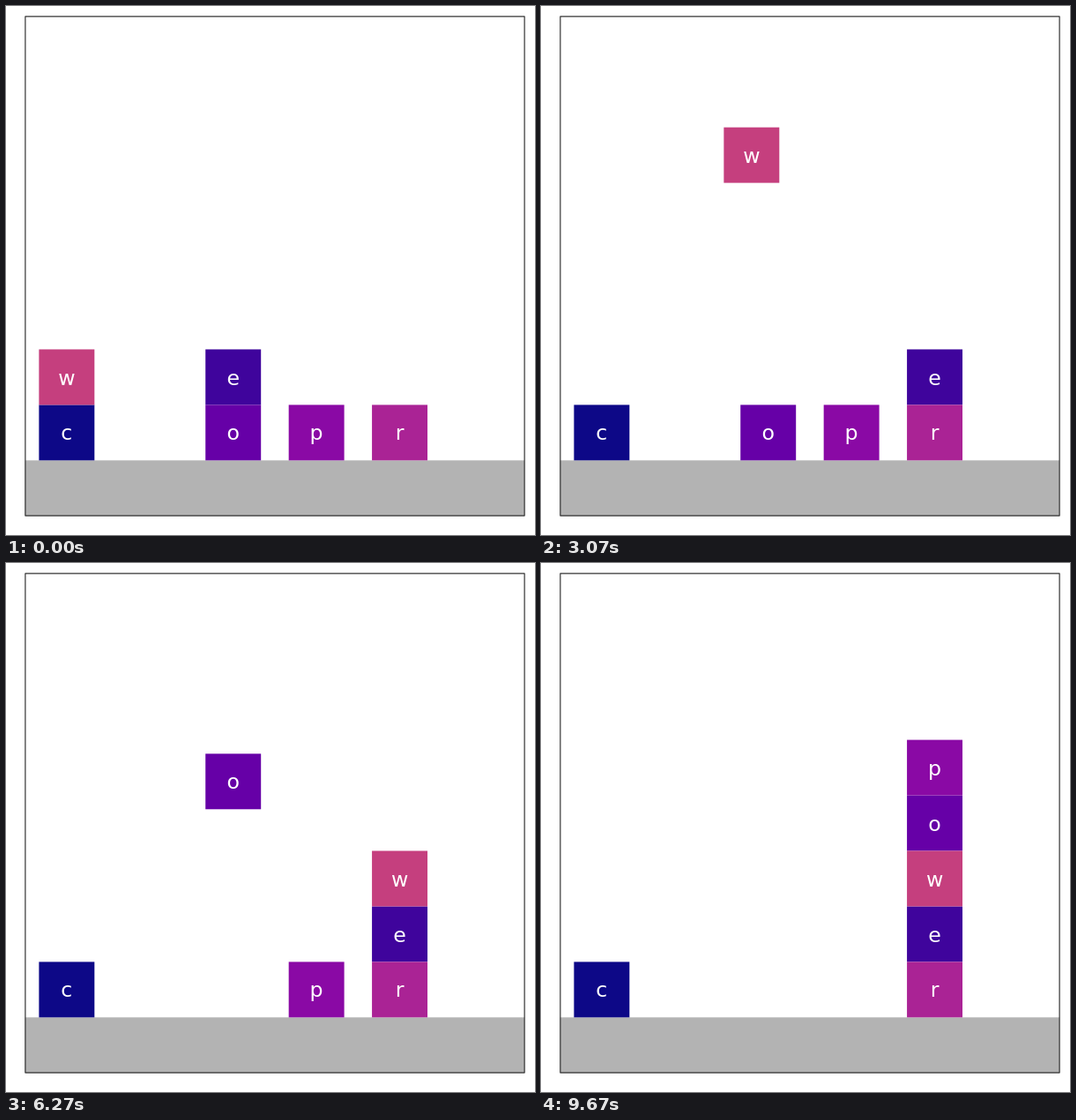
Write an HTML page with a canvas that moves like this. It is 600 px wide and 600 px high and loops after 9.71 s.

```html
<!DOCTYPE html>
<html lang="en">
<head>
<meta charset="utf-8">
<title>Stacking blocks</title>
<style>
  html, body { margin: 0; width: 100%; height: 100%; overflow: hidden; background: #fff; }
  canvas { display: block; }
</style>
</head>
<body>
<canvas id="stage" width="600" height="600"></canvas>
<script>
const ctx = document.getElementById('stage').getContext('2d');

const LOOP = 9710, FRAME = 1000 / 30, LAST_FRAME = 290;
const UNIT = 62.95, LEFT = 21.65, BOTTOM = 578.3;
const CARRY_LEVEL = 6;

// Timing of one move, in frames
const MOVE = 58, LIFT = 20, ACROSS_START = 29, ACROSS = 10, DROP = 20;

// Column is the horizontal slot, level the height above the floor
const blocks = {
  c: { column: 0, level: 1, color: '#0d0887' },
  e: { column: 2, level: 2, color: '#3f049c' },
  o: { column: 2, level: 1, color: '#6600a7' },
  p: { column: 3, level: 1, color: '#8a09a5' },
  r: { column: 4, level: 1, color: '#aa2395' },
  w: { column: 0, level: 2, color: '#c53f7e' }
};

const moves = [
  { name: 'e', column: 4, level: 2 },
  { name: 'w', column: 3, level: 2 },
  { name: 'w', column: 4, level: 3 },
  { name: 'o', column: 4, level: 4 },
  { name: 'p', column: 4, level: 5 }
];

const clamp = v => Math.min(1, Math.max(0, v));
const mix = (a, b, k) => a + (b - a) * k;

// The first frame of a phase rests; the following ones run one step ahead.
const progress = (frame, length) => frame > 0 ? clamp((frame + 1) / length) : 0;

function carry(from, to, frame) {
  const across = frame - ACROSS_START;
  const drop = clamp((across + 1 - ACROSS) / DROP);
  const level = drop > 0
    ? mix(CARRY_LEVEL, to.level, drop)
    : mix(from.level, CARRY_LEVEL, progress(frame, LIFT));
  return { column: mix(from.column, to.column, progress(across, ACROSS)), level };
}

function layout(frame) {
  const places = { ...blocks };
  moves.forEach((move, i) => {
    const local = frame - i * MOVE;
    if (local > 0) places[move.name] = carry(places[move.name], move, local);
  });
  return places;
}

function drawBlock(name, { column, level }) {
  const x = LEFT + UNIT * (0.25 + 1.5 * column);
  const y = BOTTOM - UNIT * (level + 1);
  ctx.fillStyle = blocks[name].color;
  ctx.fillRect(x, y, UNIT, UNIT);
  ctx.fillStyle = '#fff';
  ctx.fillText(name, x + UNIT / 2, y + UNIT / 2 + 8.6);
}

function draw(now) {
  const time = now % LOOP;
  const frame = Math.min(LAST_FRAME, Math.floor((time + 3.4) / FRAME));

  ctx.fillStyle = '#fff';
  ctx.fillRect(0, 0, 600, 600);
  ctx.fillStyle = '#b3b3b3';
  ctx.fillRect(LEFT, BOTTOM - UNIT, UNIT * 9, UNIT);

  ctx.font = '23.7px "DejaVu Sans", sans-serif';
  ctx.textAlign = 'center';
  for (const [name, place] of Object.entries(layout(frame))) drawBlock(name, place);

  ctx.strokeStyle = '#333';
  ctx.lineWidth = 1.2;
  ctx.lineJoin = 'round';
  ctx.strokeRect(21.9, 11.9, 566.2, 566.2);
}

const start = performance.now();
function tick() {
  draw(performance.now() - start);
  requestAnimationFrame(tick);
}
tick();
</script>
</body>
</html>
```
